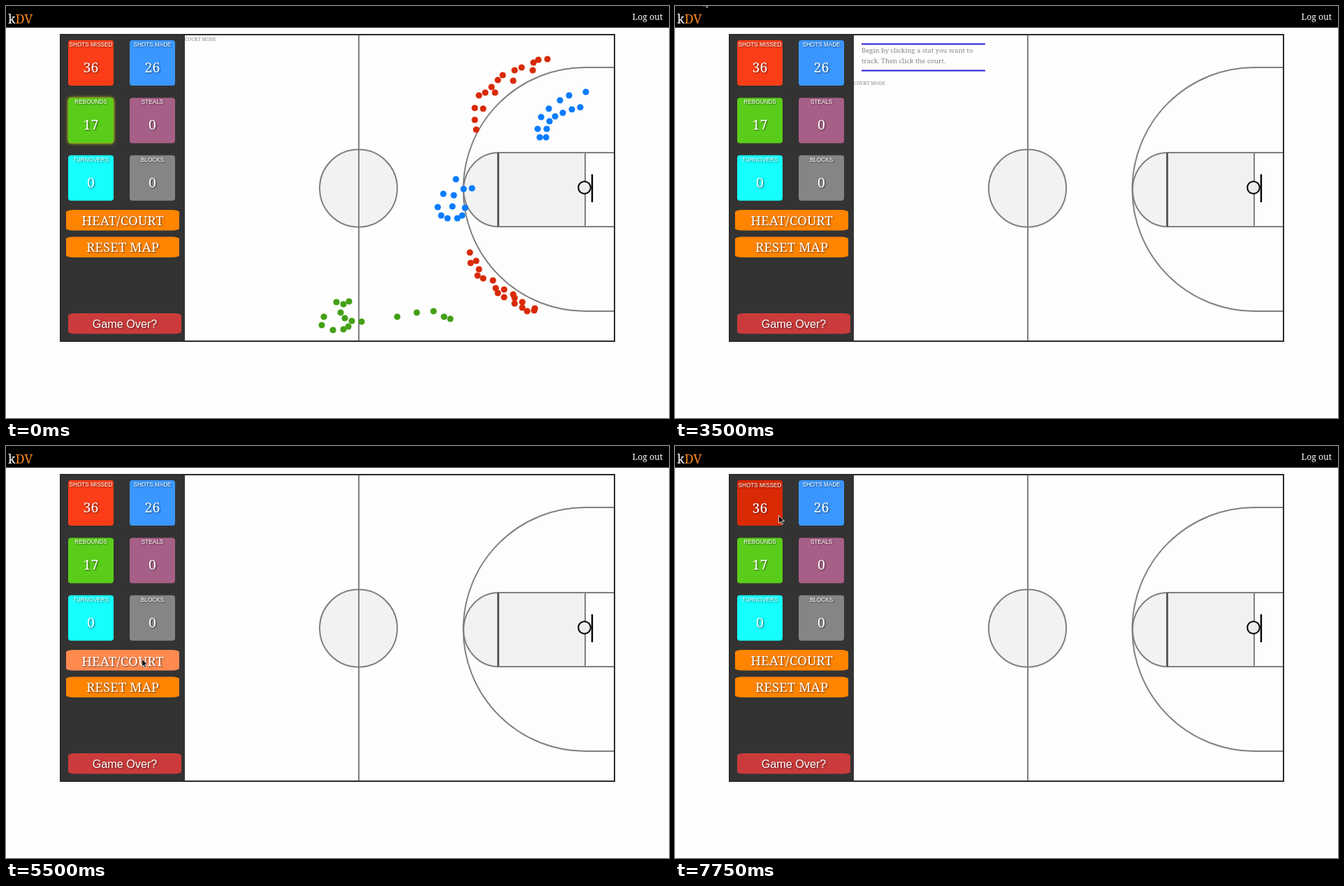
An HTML page for the animation above (8 s loop, 949 by 590 pixels).

```html
<!DOCTYPE html>
<html lang="en">
<head>
<meta charset="utf-8">
<title>Court tracker</title>
<style>
  html, body { margin: 0; width: 100%; height: 100%; overflow: hidden; background: #fefefe; }
  svg { display: block; }
  text { font-family: "Noto Serif", serif; fill: #fff; }
  .sans { font-family: "Liberation Sans", Arial, sans-serif; }
  .mid { text-anchor: middle; }
  .shade { filter: drop-shadow(1px 1px 1px rgba(0, 0, 0, .6)); }
  .hover text { transform: translateY(1px); }
  .glow rect { filter: drop-shadow(0 0 2px #b5b81c); stroke: #8aa81c; }
  .line { stroke: #808080; stroke-width: 2; fill: none; }
  .note { fill: #858585; }
</style>
</head>
<body>
<svg width="949" height="590" viewBox="0 0 949 590">
  <rect width="949" height="31"/>
  <text x="3" y="25" font-size="18">k<tspan fill="#ff8a22">DV</tspan></text>
  <text x="940" y="20" font-size="12.2" text-anchor="end">Log out</text>

  <rect x="78" y="41" width="793" height="439" fill="#fefefe"/>
  <rect x="78" y="41" width="178" height="439" fill="#333"/>

  <g class="line">
    <path d="M870 88H829A174.5 174.5 0 0 0 829 437H870" fill="#fdfdfd"/>
    <circle cx="504.5" cy="261" r="55.5" fill="#f2f2f2"/>
    <path d="M505 42V479"/>
    <path d="M705 210A50 53 0 0 0 705 316" fill="#f2f2f2"/>
    <rect x="705" y="210" width="124" height="106" fill="#f1f1f1"/>
    <path d="M829 210H870M829 316H870"/>
    <path d="M704.5 210V316" stroke="#5c5c5c" stroke-width="3"/>
  </g>
  <g stroke="#000" stroke-width="2">
    <circle cx="828" cy="260" r="8.8" fill="#eee"/>
    <path d="M839 241V281" stroke-width="2.4"/>
  </g>
  <rect x="78" y="41" width="793" height="439" fill="none" stroke="#2b2b2b" stroke-width="2"/>

  <g id="dots"></g>
  <g id="hint">
    <path d="M267 54.5H444M267 92.5H444" stroke="#2020dc" stroke-width="2"/>
    <text class="note" x="267" y="67" font-size="9.5">Begin by clicking a stat you want to</text>
    <text class="note" x="267" y="82" font-size="9.5">track. Then click the court.</text>
  </g>
  <text id="mode" class="note" x="256" font-size="6.8">COURT MODE</text>
  <g id="panel"></g>
  <path id="cursor" d="M0 0V11L2.5 8.7 4.3 12.8 6.1 12 4.3 8H8Z" stroke="#fff" stroke-width=".8"/>
</svg>
<script>
const $ = id => document.getElementById(id);

function add(parent, tag, attrs, text = "") {
  const el = document.createElementNS("http://www.w3.org/2000/svg", tag);
  for (const key in attrs) el.setAttribute(key, attrs[key]);
  el.textContent = text;
  parent.append(el);
  return el;
}

function dots(fill, points) {
  for (const [cx, cy] of points) add($("dots"), "circle", { cx, cy, r: 4.6, fill });
}

function tile(col, row, fill, label, value) {
  const g = add($("panel"), "g", {});
  const x = 89 + 88 * col, y = 49 + 82.4 * row, mid = x + 32.5;
  add(g, "rect", { x, y, width: 65, height: 65, rx: 4, fill });
  add(g, "text", { class: "sans mid shade", x: mid, y: y + 8.7, "font-size": 8.2 }, label);
  add(g, "text", { class: "mid shade", x: mid, y: y + 46, "font-size": 19.5 }, value);
  return g;
}

function button(x, y, fill, label, cls, size) {
  const g = add($("panel"), "g", {});
  add(g, "rect", { x, y, width: 162, height: 29.5, rx: 10, ry: 3, fill });
  add(g, "text", { class: cls + " mid shade", x: x + 81, y: y + 15 + size * .36, "font-size": size }, label);
  return g;
}

dots("#d92a06", [
  [775, 76], [762, 77], [755, 81], [754, 92], [738, 88], [728, 92], [726, 107], [711, 99], [704, 106],
  [695, 116], [700, 124], [686, 124], [677, 128], [671, 146], [683, 147], [671, 163], [673, 177],
  [664, 353], [673, 365], [665, 368], [677, 377], [675, 386], [683, 390], [697, 393], [701, 404],
  [704, 411], [713, 406], [713, 417], [726, 413], [728, 418], [728, 426], [739, 424], [739, 432],
  [746, 437], [756, 436], [757, 433]]);
dots("#0a7cff", [
  [830, 123], [806, 128], [793, 135], [777, 147], [766, 159], [761, 176], [764, 188], [773, 188],
  [774, 176], [778, 165], [786, 158], [797, 153], [810, 148], [822, 145], [644, 248], [667, 261],
  [655, 262], [641, 271], [626, 269], [618, 288], [639, 287], [657, 289], [623, 300], [632, 304],
  [646, 304], [653, 300]]);
dots("#43a016", [
  [491, 423], [483, 427], [473, 424], [479, 439], [485, 447], [455, 445], [452, 457], [468, 464],
  [483, 463], [490, 459], [495, 451], [509, 452], [560, 445], [588, 439], [612, 437], [627, 445],
  [636, 448]]);

const missed = tile(0, 0, "#fb3e17", "SHOTS MISSED", 36);
tile(1, 0, "#3a97ff", "SHOTS MADE", 26);
const rebounds = tile(0, 1, "#5acd1a", "REBOUNDS", 17);
tile(1, 1, "#a65f86", "STEALS", 0);
tile(0, 2, "#16ffff", "TURNOVERS", 0);
const blocks = tile(1, 2, "#858585", "BLOCKS", 0);
const heat = button(86, 292, "#ff8400", "HEAT/COURT", "", 18.7);
button(86, 330.5, "#ff8400", "RESET MAP", "", 18.7);
button(89, 440, "#cb3b3b", "Game Over?", "sans", 16.2);

// Cursor stops: time, x, y
const stops = [
  [0, -20, -20], [500, 79, 26], [750, 78, 80], [1000, 78, 140], [1250, 78, 185], [1500, 78, 208],
  [1750, 76, 160], [2000, 70, 90], [2250, 55, 30], [2500, 40, -12], [3500, 41, -10.5],
  [3750, 82, 120], [4000, 165, 250], [4250, 194.5, 301], [4500, 194.5, 307], [4750, 194.5, 306],
  [5000, 194.5, 305], [6000, 182, 234], [6250, 175, 185], [6500, 171, 147.5], [6750, 167, 130],
  [7000, 163, 112], [7250, 152, 104], [7500, 149, 101], [7750, 148.5, 99.5]];

const show = (el, on) => el.style.display = on ? "" : "none";

function hover(el, on, color) {
  el.setAttribute("class", on ? "hover" : "");
  el.firstChild.style.fill = on ? color : "";
}

function frame(now) {
  const t = now % 8000;
  const [, x, y] = stops.findLast(s => s[0] <= t);
  const cleared = t >= 3500;
  show($("dots"), !cleared);
  show($("hint"), cleared && t < 5500);
  show($("mode"), t < 5500);
  $("mode").setAttribute("y", cleared ? 113.3 : 49.7);
  rebounds.setAttribute("class", cleared ? "" : "glow");
  hover(heat, t >= 4250 && t < 6000, "#ff8a50");
  hover(blocks, t >= 6000 && t < 6250, "#5f5f5f");
  hover(missed, t >= 7250, "#d92905");
  $("cursor").setAttribute("transform", `translate(${x} ${y})`);
  requestAnimationFrame(frame);
}
requestAnimationFrame(frame);
</script>
</body>
</html>
```
